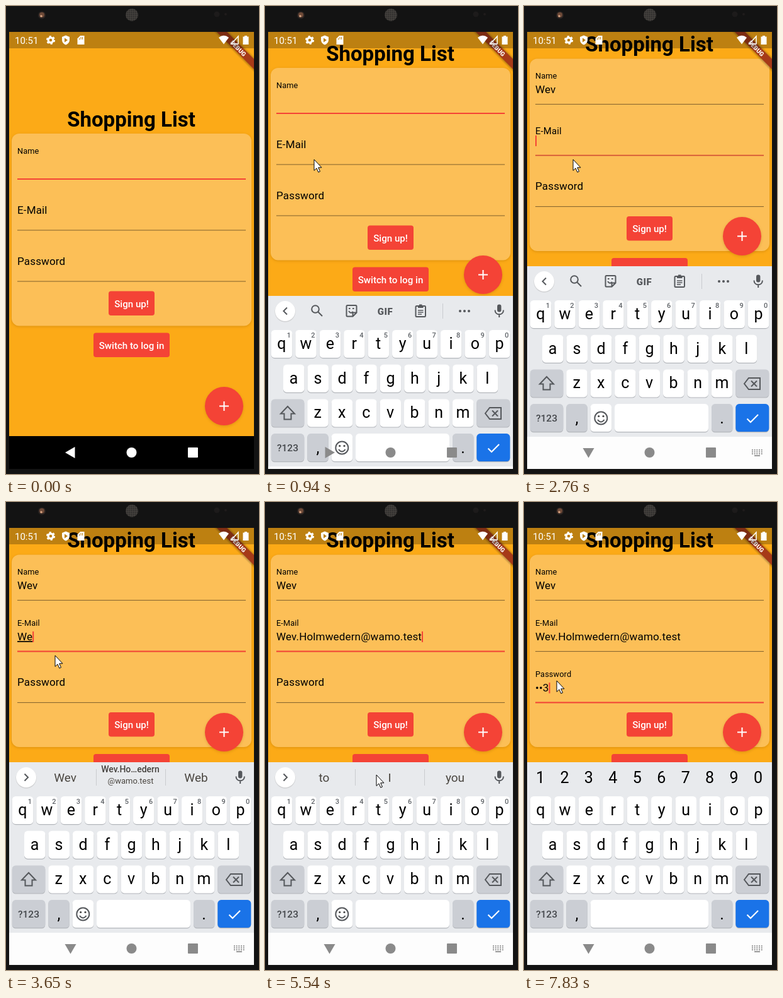
Write an HTML page that moves like this. It is 402x741 px and loops after 8 s.

```html
<!DOCTYPE html>
<html lang="en">
<head>
<meta charset="utf-8">
<title>Sign-up form</title>
<style>
  html, body { margin: 0; width: 100%; height: 100%; overflow: hidden; background: #131313; }
  svg { display: block; width: 100vw; height: 100vh; font-family: Roboto, sans-serif; }
  .mid { text-anchor: middle; }
  .field { font-size: 17.04px; letter-spacing: .14px; }
  .button { font-size: 15.14px; font-weight: 500; fill: #fff; text-anchor: middle; }
  .letter { font-size: 25px; text-anchor: middle; }
  .hint { font-size: 11px; font-weight: 500; fill: #5f6368; text-anchor: middle; }
  .word { font-size: 19px; fill: #4a4640; text-anchor: middle; }
  .line { fill: none; stroke: #55585c; stroke-width: 2; }
</style>
</head>
<body>
<svg id="stage" viewBox="0 0 402 741">
  <defs>
    <clipPath id="screen"><rect x="5" y="41" width="389" height="692"/></clipPath>
    <filter id="soft" x="-20%" y="-20%" width="140%" height="140%"><feGaussianBlur stdDeviation="2"/></filter>
    <pattern id="mesh" width="3" height="3" patternUnits="userSpaceOnUse">
      <rect width="3" height="3" fill="#45423f"/><circle cx="1.5" cy="1.5" r="1" fill="#272625"/>
    </pattern>
  </defs>

  <rect width="402" height="741" fill="#131313"/>
  <circle cx="57" cy="14.5" r="6" fill="#2b2422"/>
  <circle cx="57" cy="14" r="4" fill="#6e4a38"/>
  <circle cx="56" cy="16" r="1.7" fill="#d9a583"/>
  <circle cx="200" cy="14" r="10" fill="url(#mesh)"/>
  <circle cx="335" cy="13" r="4.5" fill="#1d1b1b"/>
  <circle cx="349" cy="13" r="2" fill="#1f1c1c"/>

  <g clip-path="url(#screen)">
    <rect x="5" y="41" width="389" height="641" fill="#fcaa17"/>
    <g id="form"></g>

    <g id="fab">
      <circle cx="346.5" cy="635" r="30.5" fill="#8a4a00" opacity=".25" filter="url(#soft)"/>
      <circle cx="346.5" cy="633.5" r="30.5" fill="#f44336"/>
      <path d="M339 633.5h15M346.5 626v15" stroke="#fff" stroke-width="2"/>
    </g>

    <g transform="translate(369 67) rotate(45)">
      <rect x="-60" y="-5.7" width="120" height="12" fill="#000" opacity=".45" filter="url(#soft)"/>
      <rect x="-60" y="-5.7" width="120" height="11.4" fill="#a63a18"/>
      <text class="mid" y="3.5" font-size="9.65" font-weight="900" fill="#fff">DEBUG</text>
    </g>

    <rect x="5" y="41" width="389" height="26" opacity=".25"/>
    <g fill="#fff">
      <text x="14" y="60" font-size="15">10:51</text>
      <g fill="none" stroke="#fff">
        <circle cx="71" cy="54" r="3.9" stroke-width="3.2"/>
        <circle cx="71" cy="54" r="5.9" stroke-width="2.4" stroke-dasharray="3.1 3.08"/>
      </g>
      <path d="M95 46.5l6 2.4v4.6c0 4-2.6 6.7-6 8-3.4-1.3-6-4-6-8v-4.6z"/>
      <path d="M93 50.5v7l5-3.5z" fill="#bd8011"/>
      <path d="M118 47h6.5v14h-11V51.5z"/>
      <path d="M116.5 51v2.5M119 49v4M121.5 49v4" stroke="#bd8011"/>
      <path d="M338 50q8-6.5 16 0l-8 10.5z"/>
      <path d="M358 60h11V48z" fill="none" stroke="#fff" stroke-width="1.5"/>
      <path d="M379 47h4v1.5h2.5V61h-9V48.5h2.5z"/>
    </g>

    <rect x="5" y="681" width="389" height="52"/>
    <g id="keyboard"></g>
    <g id="nav">
      <path id="back" d="M-8.5 0L7 -9V9z"/>
      <circle cx="199.5" cy="707" r="8"/>
      <rect x="289" y="699" width="16" height="16" rx="1"/>
      <g id="switcher" stroke="#8e8e8e" stroke-width="1.8">
        <path d="M362 703h17M362 706h17M362 709h17" stroke-dasharray="1.8 1.9"/>
        <path d="M366 712h9"/>
      </g>
    </g>
  </g>
  <path id="mouse" d="M0 0V17.5L4 13.8 6.8 20.2 9.5 19 6.7 12.8H12z" fill="#fff" stroke="#000"/>
</svg>

<script>
const LOOP = 8000;
const FRAME = 70;
const FRAME_PHASE = 30;
const RED = '#f44336';
const $ = id => document.getElementById(id);

const MAIL = 'Wev.Holmwedern@wamo.test';
// typed: [time, text, composing underline]
const fields = [
  { label: 'Name', typed: [[0, ''], [2080, 'W', 1], [2350, 'We', 1], [2490, 'Wev', 1], [2690, 'Wev']],
    focus: [[0, 1], [2689, 1], [2690, 0]], float: [[0, 1]], caret: [[1050, 1550], [2080, 2690]] },
  { label: 'E-Mail', typed: [[0, ''], [3180, 'W', 1], [3510, 'We', 1], [3720, 'Wev', 1], [5470, MAIL]],
    focus: [[2690, 0], [2760, .6], [2900, 1], [6469, 1], [6470, 0]],
    float: [[2660, 0], [2690, .1], [2760, .5], [2830, .9], [2900, 1]],
    caret: [[2690, 4250], [4760, 5250], [5470, 6040]] },
  { label: 'Password', typed: [[0, ''], [7360, '1'], [7630, '•2'], [7830, '••3']],
    focus: [[6470, 0], [6540, .6], [6690, 1]],
    float: [[6450, 0], [6470, .1], [6540, .5], [6610, .9], [6690, 1]],
    caret: [[6470, 6960], [7360, LOOP]] },
];
const mousePath = [[70, 112, 741], [240, 104, 520], [400, 97, 378], [560, 84, 275], [680, 78, 243], [4440, 78, 243],
  [4510, 86, 268], [4650, 125, 391], [4790, 150, 430], [4930, 166, 440], [5250, 177, 432], [5730, 177, 432],
  [5870, 165, 415], [6080, 110, 345], [6290, 62, 290], [6430, 52, 283]];
// [time, app inset, keyboard drop, back icon angle]
const slide = [[800, 0, 321, 0], [870, 84, 185, 90], [940, 208, 47, 180], [1010, 255, 10, 270],
  [1080, 267, 1, 270], [1150, 269, 0, 270]];
const toolbars = [[0, 'tools'], [2350, 'names'], [2690, 'tools'], [3510, 'names'], [5470, 'words'], [6520, 'digits']];

const stepAt = (steps, t) => steps.filter(s => s[0] <= t).pop() || steps[0];
function tween(steps, t) {
  const next = steps.findIndex(s => s[0] > t);
  if (next < 0) return steps[steps.length - 1].slice(1);
  if (next === 0) return steps[0].slice(1);
  const a = steps[next - 1], b = steps[next], p = (t - a[0]) / (b[0] - a[0]);
  return a.slice(1).map((v, i) => v + (b[i + 1] - v) * p);
}

const button = (x, y, w, text) => `
  <rect x="${x}" y="${y}" width="${w}" height="38.5" rx="4" fill="${RED}"/>
  <text class="button" x="199.5" y="${y + 25}">${text}</text>`;

$('form').innerHTML = `
  <text class="mid" x="199" y="190.5" font-size="33" font-weight="700">Shopping List</text>
  <rect x="9" y="203.5" width="381" height="304" rx="12" fill="#b87400" opacity=".5" filter="url(#soft)"/>
  <rect x="9" y="202" width="381" height="304.5" rx="12" fill="#fcbf57"/>
  ${fields.map((f, i) => `<g transform="translate(18 ${i * 81})">
    <text class="field" id="label${i}">${f.label}</text>
    <text class="field" id="input${i}" y="256.5"></text>
    <path d="M0 274h363" stroke="#000" stroke-opacity=".5"/>
    <path id="focus${i}" d="M0 274h363" stroke="${RED}" stroke-width="2"/>
    <rect id="caret${i}" y="242.3" width="2" height="17" fill="${RED}"/>
  </g>`).join('')}
  ${button(163, 451.5, 73, 'Sign up!')}
  ${button(139, 517.5, 121, 'Switch to log in')}`;

const PITCH = 38.45, ROW = 54.7, GREY = '#cbced4';
const key = (x, row, w = 33.5, fill = '#fff') => {
  const y = 466 + row * ROW;
  return `<rect x="${x}" y="${y + 1.2}" width="${w}" height="44" rx="5.5" fill="#b3b6bb"/>
    <rect x="${x}" y="${y}" width="${w}" height="44" rx="5.5" fill="${fill}"/>`;
};
const letters = (chars, x, row) => [...chars].map((c, i) => key(x + i * PITCH, row) +
  `<text class="letter" x="${x + 16.6 + i * PITCH}" y="${496 + row * ROW}">${c}</text>`).join('');
const digitRow = (cls, x, y) => [...'1234567890'].map((c, i) =>
  `<text class="${cls}" x="${x + i * PITCH}" y="${y}">${c}</text>`).join('');
const word = (x, text) => `<text class="word" x="${x}" y="443">${text}</text>`;
const chevron = d => `<circle cx="32" cy="437" r="16.5" fill="#bbb" opacity=".5"/>
  <circle cx="32" cy="436" r="16" fill="#fff"/><path class="line" d="${d}"/>`;
const dividers = '<path d="M143.5 423v26M253.5 423v26" stroke="#c9cbcf"/>';

$('keyboard').innerHTML = `
  <rect x="5" y="412" width="389" height="270" fill="#e8eaed"/>
  <rect x="5" y="682" width="389" height="60" fill="#fdfdfd"/>
  ${letters('qwertyuiop', 9.8, 0)}${letters('asdfghjkl', 29, 1)}${letters('zxcvbnm', 67.2, 2)}
  ${key(9.8, 2, 52.5, GREY)}${key(336.3, 2, 53, GREY)}
  ${key(9.8, 3, 52.5, GREY)}${key(67.2, 3, 33.5, GREY)}${key(298, 3, 33.5, GREY)}${key(336.3, 3, 53, '#1a73e8')}
  <path class="line" d="M36 587l11 11.5h-5.5v9h-11v-9H25z"/>
  <path class="line" d="M350 598l7-9h18v18h-18zM361 593.5l9 9M370 593.5l-9 9"/>
  <text class="mid" x="36" y="658" font-size="15.5" font-weight="500" fill="#45484c">?123</text>
  <text class="letter" x="84" y="661">,</text><text class="letter" x="314.5" y="661">.</text>
  <path d="M354.5 653.5l5.5 5.5 12-12" fill="none" stroke="#fff" stroke-width="2.2"/>
  <g id="plain">
    ${digitRow('hint', 38, 478)}
    ${key(105.6, 3)}${key(144, 3, 149)}
    <circle class="line" cx="122.3" cy="652.5" r="10"/>
    <path class="line" d="M117 655q5.3 7 10.6 0"/>
    <circle cx="118.7" cy="649.5" r="1.6" fill="#444"/><circle cx="126" cy="649.5" r="1.6" fill="#444"/>
    <rect x="369" y="425.5" width="6.4" height="12" rx="3.2" fill="#55585c"/>
    <path class="line" d="M365.5 434.5c0 9 13.4 9 13.4 0M372.2 441v5"/>
  </g>
  <g id="tools">
    ${chevron('M35 430.5l-5.5 5.5 5.5 5.5')}
    <circle class="line" cx="80" cy="433" r="5.8"/><path class="line" d="M84.5 437.5l6.5 6.5"/>
    <path class="line" d="M131 427h13q1.5 0 1.5 1.5v10l-6 6H131q-1.5 0-1.5-1.5v-14.5q0-1.5 1.5-1.5zM145 438.5h-5.5v5.5M133 436q3.5 5 7 1"/>
    <path d="M133 432h2.5M139 432h2.5" stroke="#55585c" stroke-width="2.2"/>
    <text class="mid" x="191" y="441.5" font-size="15" font-weight="900" fill="#55585c" letter-spacing=".5">GIF</text>
    <rect class="line" x="239.5" y="428" width="15.5" height="17" rx="1.5"/>
    <path d="M243 427h8.5v4H243zM245 425.5h4.5v3H245z" fill="#55585c"/>
    <path d="M243 435h8.5M243 438h8.5M243 441h6" stroke="#55585c" stroke-width="1.5"/>
    <path d="M282.5 424v24" stroke="#c9cbcf"/>
    <g fill="#55585c"><circle cx="310" cy="436" r="2"/><circle cx="317" cy="436" r="2"/><circle cx="324" cy="436" r="2"/></g>
  </g>
  <g id="suggest">${chevron('M29.5 430.5l5.5 5.5-5.5 5.5')}${dividers}</g>
  <g id="names">
    ${word(94, 'Wev')}${word(302, 'Web')}
    <text class="mid" x="197.5" y="428" font-size="14" font-weight="500" fill="#45423f">Wev.Ho…edern</text>
    <text class="mid" x="198" y="446" font-size="13" fill="#4a4640">@wamo.test</text>
  </g>
  <g id="words">${word(94, 'to')}${word(198, 'I')}${word(302, 'you')}</g>
  <g id="digits">${digitRow('letter', 26, 445)}${key(105.6, 3, 187.4)}</g>`;

const show = (id, on) => $(id).setAttribute('visibility', on ? 'visible' : 'hidden');
const move = (id, x, y, extra = '') => $(id).setAttribute('transform', `translate(${x} ${y}) ${extra}`);

function drawField(field, i, t, frameTime) {
  const [, text, composing] = stepAt(field.typed, t);
  const input = $('input' + i);
  if (input.textContent !== text) input.textContent = text;
  input.setAttribute('text-decoration', composing ? 'underline' : 'none');
  const [float] = tween(field.float, frameTime);
  move('label' + i, 0, 247.5 - 14 * float, `scale(${1 - .25 * float})`);
  $('focus' + i).setAttribute('opacity', tween(field.focus, frameTime)[0]);
  $('caret' + i).setAttribute('x', text ? input.getComputedTextLength() : 0);
  show('caret' + i, field.caret.some(([from, to]) => t >= from && t < to));
}

function draw(t) {
  const frameTime = Math.floor((t - FRAME_PHASE) / FRAME) * FRAME + FRAME_PHASE;
  const [inset, drop, angle] = tween(slide, frameTime);
  move('form', 0, -Math.min(inset / 2, 118.4));
  move('fab', 0, -inset);
  move('keyboard', 0, drop);
  const up = frameTime > 800;
  show('keyboard', up);
  $('nav').setAttribute('fill', frameTime >= 940 ? '#8a8a8a' : '#fff');
  move('back', 102.5, 707, `rotate(${angle})`);
  show('switcher', frameTime >= 1010);
  fields.forEach((field, i) => drawField(field, i, t, frameTime));

  const mode = stepAt(toolbars, t)[1];
  ['tools', 'names', 'words', 'digits'].forEach(id => show(id, up && id === mode));
  show('suggest', up && (mode === 'names' || mode === 'words'));
  show('plain', up && mode !== 'digits');

  move('mouse', ...tween(mousePath, frameTime));
  show('mouse', t >= 70);
}

const start = performance.now();
function tick() {
  draw((performance.now() - start) % LOOP);
  requestAnimationFrame(tick);
}
tick();
</script>
</body>
</html>
```
